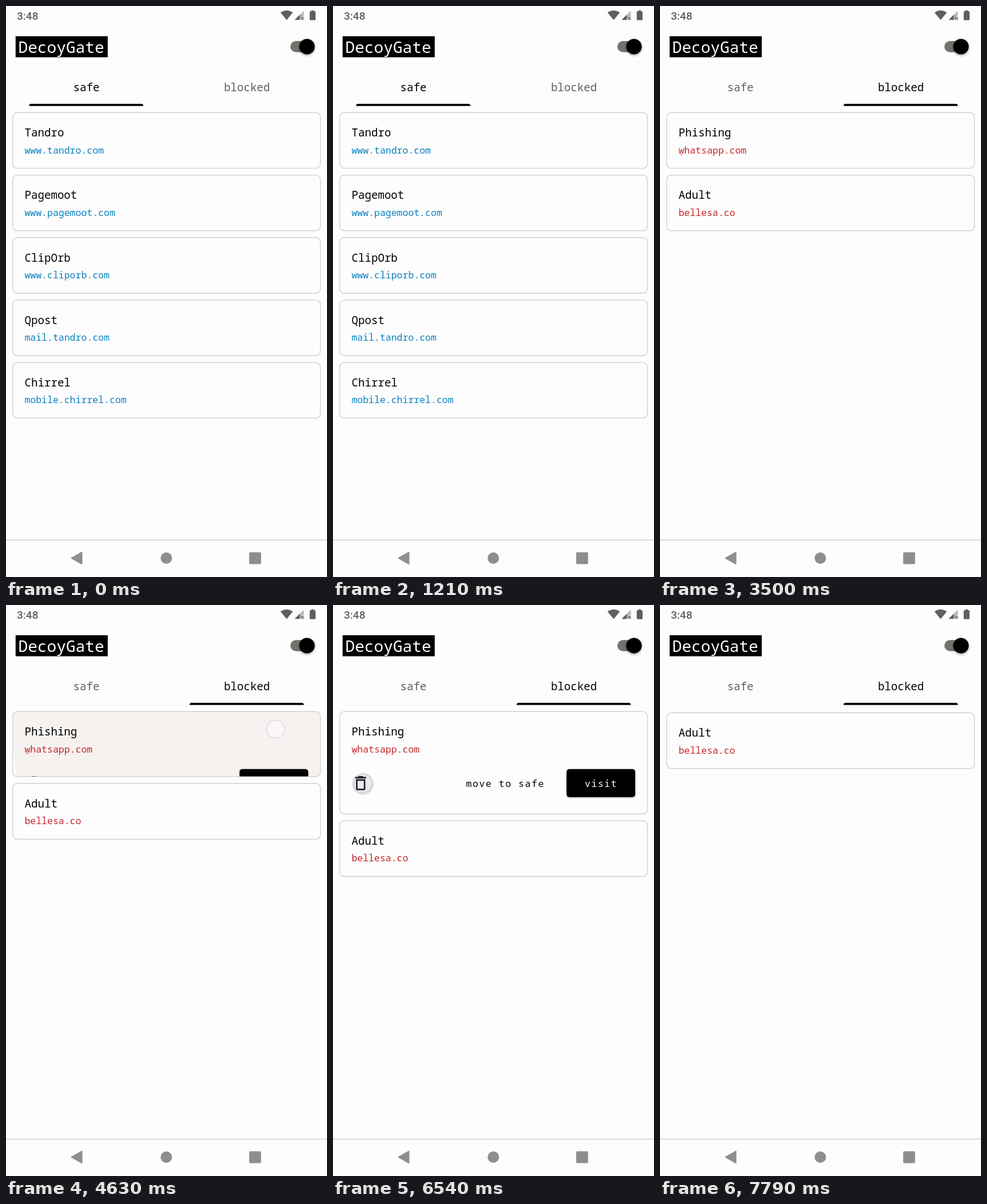
An HTML page with a canvas for the animation above (8 s loop, 561 px wide and 998 px high).

```html
<!DOCTYPE html>
<html lang="en">
<head>
<meta charset="utf-8">
<title>Link guard</title>
<style>
html, body { margin: 0; width: 100%; height: 100%; overflow: hidden; background: #fdfdfd; }
canvas { display: block; width: 561px; height: 998px; }
</style>
</head>
<body>
<canvas id="stage"></canvas>
<script>
const W = 561, H = 998, LOOP = 8000;
const MONO = '"Noto Sans Mono", "DejaVu Sans Mono", monospace';
const cv = document.getElementById('stage');
const dpr = window.devicePixelRatio || 1;
cv.width = Math.round(W * dpr);
cv.height = Math.round(H * dpr);
const g = cv.getContext('2d');

const SAFE = [
  ['Tandro', 'www.tandro.com'],
  ['Pagemoot', 'www.pagemoot.com'],
  ['ClipOrb', 'www.cliporb.com'],
  ['Qpost', 'mail.tandro.com'],
  ['Chirrel', 'mobile.chirrel.com']
];
const BLUE = '#0a80bd', RED = '#c3282c', GREY = '#5f5f5f', SOFT = '#8e8e8e';
const CARD_X = 11.7, CARD_W = 537.8, CARD_H = 97.3, OPEN_H = 179, TOP = 186.3, PITCH = 109.2;
const GAP = PITCH - CARD_H;

// Key moments in ms
const TAB_TAP = 2670, TAB_GO = 2860, CARD_TAP = 4460, CARD_GO = 4542;
const BIN_TAP = 6380, BIN_GO = 6600, BIN_SHIFT = 6760;

const trash = new Path2D('M6,19a2,2 0 0,0 2,2h8a2,2 0 0,0 2-2V7H6V19M8,9H16V19H8V9M15.5,4L14.5,3H9.5L8.5,4H5V6H19V4H15.5Z');

const part = (t, start, dur) => Math.min(1, Math.max(0, (t - start) / dur));
const lerp = (a, b, k) => a + (b - a) * k;
const sine = k => (1 - Math.cos(Math.PI * k)) / 2;

// Fast-out, slow-in: cubic-bezier(.4, 0, .2, 1)
function swift(x) {
  let lo = 0, hi = 1, s = 0.5;
  for (let i = 0; i < 24; i++) {
    s = (lo + hi) / 2;
    const bx = 1.2 * s * (1 - s) * (1 - s) + 0.6 * s * s * (1 - s) + s * s * s;
    if (bx < x) lo = s; else hi = s;
  }
  return s * s * (3 - 2 * s);
}

function text(str, x, y, size, color, weight = 400, align = 'left', family = MONO) {
  g.font = `${weight} ${size}px ${family}`;
  g.textAlign = align;
  g.fillStyle = color;
  g.fillText(str, x, y);
}

function spaced(str, x, y, color) {
  g.letterSpacing = '1.55px';
  text(str, x, y, 16.5, color, 500);
  g.letterSpacing = '0px';
}

function box(x, y, w, h, r) {
  g.beginPath();
  g.roundRect(x, y, w, h, r);
}

function disc(x, y, r, color) {
  g.beginPath();
  g.arc(x, y, r, 0, Math.PI * 2);
  g.fillStyle = color;
  g.fill();
}

function poly(color, ...pts) {
  g.beginPath();
  for (let i = 0; i < pts.length; i += 2) g.lineTo(pts[i], pts[i + 1]);
  g.closePath();
  g.fillStyle = color;
  g.fill();
}

function faded(alpha, draw) {
  if (alpha <= 0) return;
  g.save();
  g.globalAlpha *= alpha;
  draw();
  g.restore();
}

function touch(x, y, t, down, up) {
  if (t < down) return;
  faded(1 - part(t, up, 100), () => {
    disc(x, y, 15.5, 'rgba(255,255,255,.72)');
    g.strokeStyle = '#cfd2ea';
    g.lineWidth = 2;
    g.stroke();
  });
}

function statusBar() {
  text('3:48', 19, 24, 19, GREY, 500, 'left', 'Roboto, sans-serif');
  g.beginPath();
  g.moveTo(490.5, 24.5);
  g.lineTo(479.8, 11.5);
  g.quadraticCurveTo(490.5, 4, 501.2, 11.5);
  g.closePath();
  g.fillStyle = GREY;
  g.fill();
  poly('#b9b9b9', 504.5, 24.3, 520.5, 8.3, 520.5, 17, 513.5, 24.3);
  poly(GREY, 504.5, 24.3, 513.5, 15.3, 513.5, 24.3);
  g.strokeStyle = GREY;
  g.lineWidth = 1.4;
  g.beginPath();
  g.moveTo(515.5, 19.2); g.lineTo(520.6, 24.3);
  g.moveTo(520.6, 19.2); g.lineTo(515.5, 24.3);
  g.stroke();
  g.fillStyle = GREY;
  box(530.8, 9.3, 10.2, 15.5, 1.3);
  g.fill();
  g.fillRect(533.6, 7.6, 4.6, 3);
}

function header() {
  g.fillStyle = '#000';
  g.fillRect(16.8, 52.8, 161, 36.8);
  text('DecoyGate', 21.5, 81.5, 27.8, '#fff');
  g.fillStyle = '#73736d';
  box(497, 61.3, 38, 19.4, 9.7);
  g.fill();
  g.save();
  g.shadowColor = 'rgba(0,0,0,.38)';
  g.shadowBlur = 4 * dpr;
  g.shadowOffsetY = 1.6 * dpr;
  disc(526, 71, 13.6, '#000');
  g.restore();
}

function ripple(x, y, r, color, alpha) {
  faded(alpha, () => disc(x, y, r, color));
}

function tabs(t, slide) {
  if (t >= TAB_TAP && t < 3170) {
    g.save();
    g.beginPath();
    g.rect(280.5, 109, 280.5, 66);
    g.clip();
    ripple(505, 136, Math.min(235, (t - TAB_TAP) * 0.647), '#efeffb', 1 - part(t, 2960, 210));
    g.restore();
  }
  const moved = t >= TAB_GO;
  text('safe', 140.5, 149, 19.1, moved ? GREY : '#000', 500, 'center');
  text('blocked', 421, 149, 19.1, moved ? '#000' : GREY, 500, 'center');
  g.fillStyle = '#000';
  box(40.3 + 280.5 * slide, 171, 199.7, 3.7, [3.5, 3.5, 0, 0]);
  g.fill();
}

function card(y, h, label, link, color, back, extra) {
  g.save();
  box(CARD_X, y, CARD_W, h, 8);
  g.clip();
  if (back) back();
  text(label, 32.6, y + 41.8, 19.1, '#000', 500);
  text(link, 32.4, y + 71.2, 16.5, color);
  if (extra) extra();
  g.restore();
  box(CARD_X, y, CARD_W, h, 8);
  g.strokeStyle = '#d0d0d5';
  g.lineWidth = 1.4;
  g.stroke();
}

function actions(t) {
  if (t >= BIN_TAP && t < 6900) {
    ripple(52.3, 312.7, 19 * Math.min(1, 0.45 + (t - BIN_TAP) / 230), '#dcdce2', 1 - part(t, 6600, 250));
    touch(52, 312, t, BIN_TAP, 6500);
  }
  g.save();
  g.translate(32, 295);
  g.scale(1.365, 1.365);
  g.fillStyle = '#222';
  g.fill(trash, 'evenodd');
  g.restore();
  spaced('move to safe', 232.5, 317.6, '#000');
  g.save();
  g.shadowColor = 'rgba(0,0,0,.3)';
  g.shadowBlur = 3 * dpr;
  g.shadowOffsetY = 1.3 * dpr;
  g.fillStyle = '#000';
  box(408.2, 286.8, 120, 49, 5);
  g.fill();
  g.restore();
  spaced('visit', 440, 317.6, '#fff');
}

function safePage() {
  SAFE.forEach(([label, link], i) => card(TOP + i * PITCH, CARD_H, label, link, BLUE));
}

function blockedPage(t) {
  const open = sine(part(t, CARD_GO, 300));
  const h = lerp(CARD_H, OPEN_H, open);
  const shift = sine(part(t, BIN_SHIFT, 300));
  const gone = part(t, BIN_GO, 160);
  const flash = () => {
    if (t < CARD_TAP || t > 4980) return;
    ripple(471, 217, 500 * Math.min(1, Math.pow((t - CARD_TAP) / 187, 0.95)), '#f6f2f0', 1 - part(t, 4680, 300));
  };
  faded(1 - gone, () => card(TOP, h, 'Phishing', '\u1E89hatsapp.com', RED, flash, open > 0 && (() => actions(t))));
  card(lerp(TOP + h + GAP, 188.5, shift), CARD_H, 'Adult', 'bellesa.co', RED);
}

function navBar() {
  g.fillStyle = '#cdcdd0';
  g.fillRect(0, 932.8, W, 1.5);
  g.lineJoin = 'round';
  g.lineWidth = 2;
  g.strokeStyle = SOFT;
  poly(SOFT, 114.5, 965, 132.5, 954.8, 132.5, 975.2);
  g.stroke();
  disc(280.2, 965, 10, SOFT);
  g.fillStyle = SOFT;
  box(425, 954.7, 20.8, 20.8, 2);
  g.fill();
}

function draw(t) {
  g.setTransform(dpr, 0, 0, dpr, 0, 0);
  g.fillStyle = '#fdfdfd';
  g.fillRect(0, 0, W, H);
  const slide = swift(part(t, TAB_GO, 300));
  g.save();
  g.beginPath();
  g.rect(0, 175, W, 758);
  g.clip();
  g.translate(-W * slide, 0);
  if (slide < 0.999) safePage();
  g.translate(W, 0);
  if (slide > 0) blockedPage(t);
  g.restore();
  statusBar();
  header();
  tabs(t, slide);
  navBar();
  touch(505, 136.5, t, TAB_TAP, 2850);
  if (t < 5000) touch(471, 217, t, CARD_TAP, 4590);
}

const began = performance.now();
function tick() {
  draw((performance.now() - began) % LOOP);
  requestAnimationFrame(tick);
}
tick();
</script>
</body>
</html>
```
